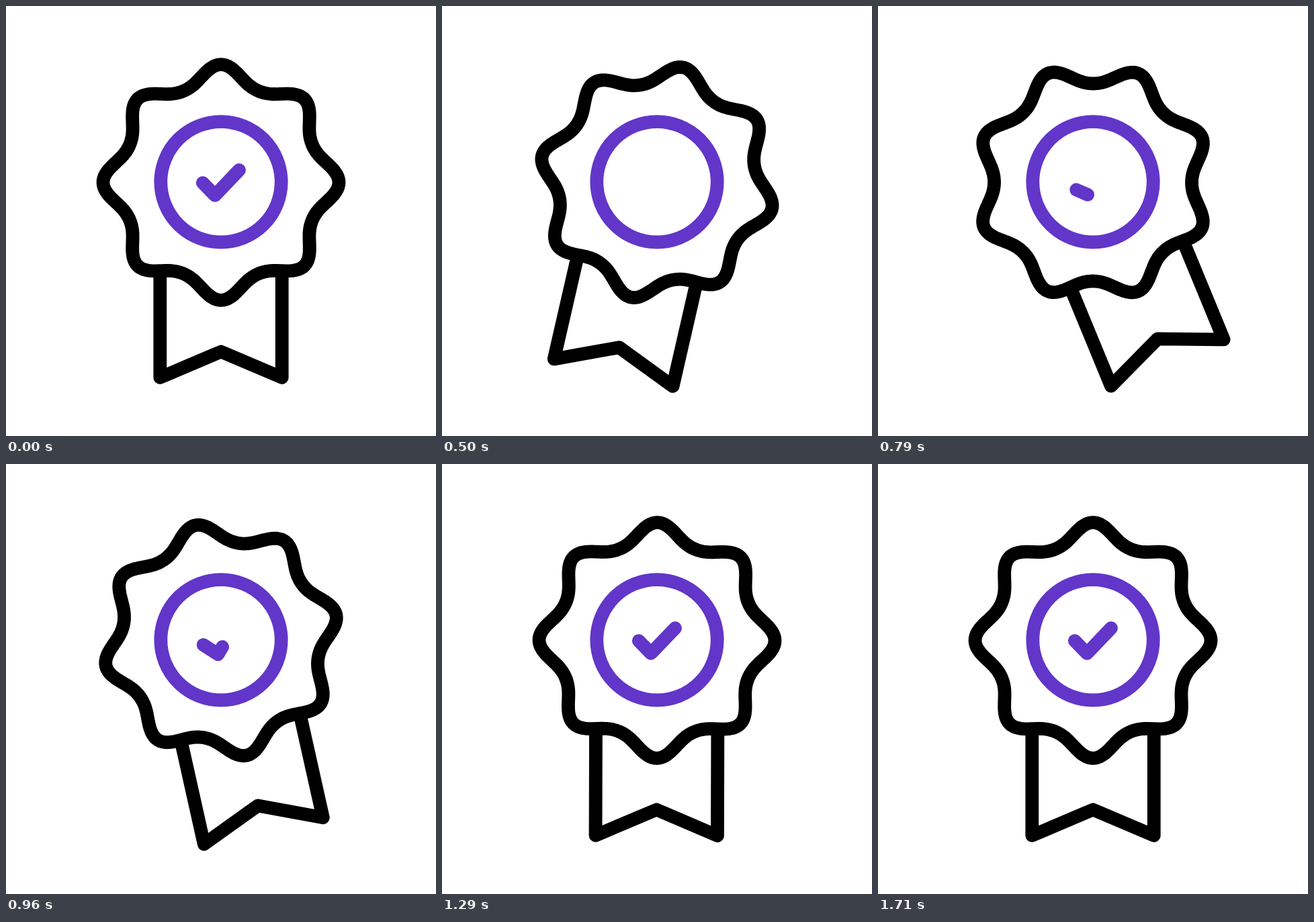
An HTML page for the animation above (2040 ms loop, 640 by 640 pixels).

```html
<!DOCTYPE html>
<html lang="en">
<head>
<meta charset="utf-8">
<title>Award badge</title>
<style>
  html, body { margin: 0; width: 100%; height: 100%; overflow: hidden; background: #fff; }
  svg { display: block; width: 100vw; height: 100vh; }
  path, circle { fill: none; stroke: #000; stroke-width: 19.8; stroke-linecap: round; stroke-linejoin: round; }
  #star { fill: #fff; }
  .accent { stroke: #6236c9; }
</style>
</head>
<body>
<svg viewBox="0 0 640 640">
  <g id="badge">
    <path d="M229.3 390V553L320 514.5L410.7 553V390"/>
    <path id="star"/>
    <path id="check" class="accent" pathLength="1" d="M292.8 263.2L311 281.8L347 244.2"/>
  </g>
  <circle class="accent" cx="320" cy="261.8" r="89.7"/>
</svg>
<script>
const LOOP = 2040, STEP = 1000 / 24;
const CX = 320, CY = 262.5;
const [badge, star, check] = ['badge', 'star', 'check'].map(id => document.getElementById(id));

// [step, degrees]: a swing that dies away
const SWING = [[4, 0], [12, 12.9], [20, -24], [27, 5], [34, -3], [41, 0]];
// [step, drawn part of the check mark]
const ERASE = [2, 8.3], DRAW = [15.4, 30.6];

const clamp = x => Math.min(1, Math.max(0, x));
const ease = s => s * s * (3 - 2 * s);
const progress = (k, [a, b]) => clamp((k - a) / (b - a));

function angleAt(k) {
  let angle = 0;
  for (let i = 1; i < SWING.length; i++) {
    const [k0, a0] = SWING[i - 1], [k1, a1] = SWING[i];
    if (k >= k0) angle = a0 + (a1 - a0) * ease(progress(k, [k0, k1]));
  }
  return angle;
}

const drawnAt = k => k < 12 ? 1 - ease(progress(k, ERASE)) : progress(k, DRAW);

// Eight soft points around the centre
function starPath() {
  const n = 320, pts = [];
  for (let i = 0; i < n; i++) {
    const a = i / n * 2 * Math.PI;
    const r = 159.75 + 14.25 * Math.cos(8 * a) + 1.5 * Math.cos(16 * a);
    pts.push((CX + r * Math.sin(a)).toFixed(2) + ' ' + (CY - r * Math.cos(a)).toFixed(2));
  }
  return 'M' + pts.join('L') + 'Z';
}

function render(t) {
  // Poses change 24 times a second, on whole hundredths
  const k = Math.floor((Math.floor(t / 10) * 10 + 4.99) / STEP);
  const drawn = drawnAt(k);
  badge.setAttribute('transform', `rotate(${angleAt(k)} ${CX} ${CY})`);
  check.setAttribute('visibility', drawn > 0 ? 'visible' : 'hidden');
  check.setAttribute('stroke-dasharray', drawn < 1 ? `${drawn} 2` : 'none');
}

star.setAttribute('d', starPath());
const start = performance.now();
function tick() {
  render((performance.now() - start) % LOOP);
  requestAnimationFrame(tick);
}
tick();
</script>
</body>
</html>
```
